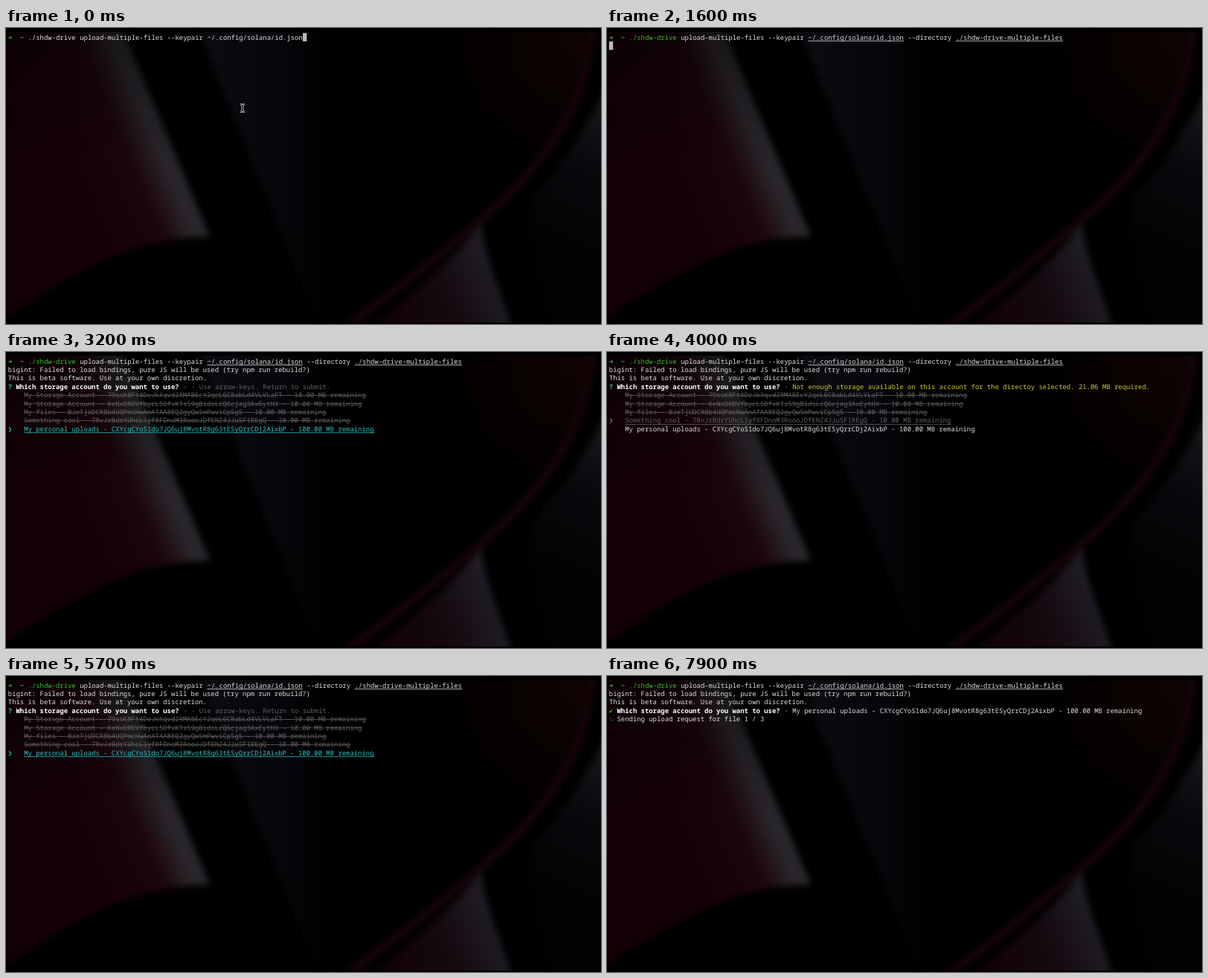
An HTML page that plays this animation: 800x399 px, repeating every 8 s.

```html
<!DOCTYPE html>
<html lang="en">
<head>
<meta charset="utf-8">
<title>Terminal upload</title>
<style>
  html, body { margin: 0; width: 100%; height: 100%; overflow: hidden; background: #000; }
  svg { display: block; width: 100%; height: 100%; }
  text {
    font: 500 8.925px "Noto Sans Mono", "DejaVu Sans Mono", monospace;
    white-space: pre;
    text-rendering: geometricPrecision;
  }
  .bold { font-weight: 700; }
</style>
</head>
<body>
<svg viewBox="0 0 800 399" xmlns="http://www.w3.org/2000/svg">
  <defs>
    <linearGradient id="red" gradientUnits="userSpaceOnUse" x1="20" y1="223" x2="214" y2="141">
      <stop offset="0" stop-color="#120004"/>
      <stop offset=".5" stop-color="#170207"/>
      <stop offset=".73" stop-color="#1c060b"/>
      <stop offset=".92" stop-color="#29262b"/>
      <stop offset="1" stop-color="#27262b"/>
    </linearGradient>
    <linearGradient id="shade" x1="0" y1="0" x2="0" y2="1">
      <stop offset="0" stop-color="#000" stop-opacity=".5"/>
      <stop offset=".5" stop-color="#000" stop-opacity="0"/>
    </linearGradient>
    <linearGradient id="panel" gradientUnits="userSpaceOnUse" x1="290" y1="0" x2="435" y2="0">
      <stop offset="0" stop-color="#0b0a10"/>
      <stop offset=".6" stop-color="#060509"/>
      <stop offset="1" stop-color="#000"/>
    </linearGradient>
    <radialGradient id="corner" gradientUnits="userSpaceOnUse" cx="765" cy="20" r="190">
      <stop offset="0" stop-color="#0e0302"/>
      <stop offset="1" stop-color="#000"/>
    </radialGradient>
    <linearGradient id="wedge" gradientUnits="userSpaceOnUse" x1="520" y1="380" x2="658" y2="322">
      <stop offset="0" stop-color="#120306"/>
      <stop offset=".5" stop-color="#150a10"/>
      <stop offset="1" stop-color="#201e27"/>
    </linearGradient>
    <linearGradient id="side" gradientUnits="userSpaceOnUse" x1="705" y1="290" x2="800" y2="80">
      <stop offset="0" stop-color="#030103"/>
      <stop offset=".55" stop-color="#0a080c"/>
      <stop offset="1" stop-color="#1b1a20"/>
    </linearGradient>
    <filter id="soft" color-interpolation-filters="sRGB" filterUnits="userSpaceOnUse" x="-30" y="-30" width="860" height="460">
      <feGaussianBlur stdDeviation="4"/>
    </filter>
    <path id="redShape" d="M-20 -20H147L274 281Q200 283 150 305Q70 340 -20 405Z"/>
    <path id="beam" d="M315 103q3 0 3 3v4q0 3-3 3M321 103q-3 0-3 3m0 4q0 3 3 3M316 108h4"/>
  </defs>

  <rect width="800" height="399"/>
  <g filter="url(#soft)">
    <use href="#redShape" fill="url(#red)"/>
    <use href="#redShape" fill="url(#shade)"/>
    <path d="M251 -15H440V410H424Z" fill="url(#panel)"/>
    <path d="M560 -20H786C790 110 705 200 640 256L560 250Z" fill="url(#corner)"/>
    <path d="M830 30C790 120 760 175 705 230C695 280 715 350 740 430H830Z" fill="url(#side)"/>
    <path d="M640 262C638 296 662 345 685 420H470C540 365 598 318 640 262Z" fill="url(#wedge)"/>
    <path d="M788 -20C792 110 705 201 640 257C580 308 520 358 455 404" fill="none" stroke="#19040a" stroke-width="9"/>
  </g>
  <path d="M0 0H800V5H0ZM0 397H800V399H0Z"/>

  <g id="screen"></g>
  <g id="pointer" fill="none">
    <use href="#beam" stroke="#ddd" stroke-width="2.6"/>
    <use href="#beam" stroke="#000"/>
  </g>
</svg>

<script>
const LOOP = 8000, LEFT = 2.8, CELL = 5.355, TOP = 6.8, LINE = 11.4;
const WHITE = '#dedede', GREEN = '#2fc12f', CYAN = '#2cc5c5', GRAY = '#626262', YELLOW = '#cbcb35';
const SPINNER = '⠋⠙⠹⠸⠼⠴⠦⠧⠇⠏';

// Times of the events in ms; each selection entry is [time, option index].
const PASTED = 100, ENTERED = 1000, STARTED = 1700, PROMPTED = 1800, SUBMITTED = 7400;
const SELECTIONS = [
  [1800, 0], [2800, 1], [2900, 2], [3000, 3], [3100, 4],
  [4000, 3], [4100, 2], [4200, 1], [4300, 0],
  [5400, 1], [5500, 2], [5600, 3], [5700, 4]
];
const OPTIONS = [
  'My Storage Account - 79ssK8Ft4DeJkXqvdZRMABEcY2qeL6C8abLd4VLVLaFT - 10.00 MB remaining',
  'My Storage Account - KeNxDRDVfbycL5DfvKTs59gBidsLcQ6cjag3AxEytHX - 10.00 MB remaining',
  'My files - BJeTjUDCR8b4UQPmcHwAnATAA8EQ2gyQwSmPwviCpSg5 - 10.00 MB remaining',
  'Something cool - 7RvJrBdrYUhcL1yf8FDnoM3RoooJDfENZ4JJuSF1REgQ - 10.00 MB remaining',
  'My personal uploads - CXYcgCYoS1do7JQ6uj8MvotR8g63tESyQrrCDj2AixbP - 100.00 MB remaining'
];
const USABLE = OPTIONS.length - 1;

const screen = document.getElementById('screen');
const pointer = document.getElementById('pointer');
const colX = col => LEFT + col * CELL;
const rowY = row => TOP + row * LINE;

// A run of text at a cell; rule is the height of an optional line across it.
function put(row, col, str, color = WHITE, { bold = false, rule = 0 } = {}) {
  const text = `<text x="${colX(col)}" y="${rowY(row) + 8.8}" fill="${color}"${bold ? ' class="bold"' : ''}>${str}</text>`;
  return rule
    ? text + `<rect x="${colX(col)}" y="${rowY(row) + rule}" width="${str.length * CELL}" height=".75" fill="${color}"/>`
    : text;
}
const UNDER = { rule: 10.4 }, STRIKE = { rule: 5.7 }, BOLD = { bold: true };

const block = (row, col) =>
  `<rect x="${colX(col)}" y="${rowY(row)}" width="${CELL}" height="11.2" fill="#bcbcbc"/>`;

function commandLine(t) {
  const pasted = t >= PASTED;
  const path = pasted ? UNDER : {};
  let out = put(0, 0, '➜', '#45d96c', BOLD) + put(0, 3, '~', CYAN, BOLD)
    + put(0, 5, './shdw-drive', pasted ? GREEN : WHITE)
    + put(0, 18, 'upload-multiple-files --keypair')
    + put(0, 50, '~/.config/solana/id.json', WHITE, path);
  if (pasted) out += put(0, 75, '--directory') + put(0, 87, './shdw-drive-multiple-files', WHITE, UNDER);
  if (t < ENTERED) out += block(0, pasted ? 114 : 74);
  return out;
}

function question(mark, color) {
  return put(3, 0, mark, color, BOLD)
    + put(3, 2, 'Which storage account do you want to use?', '#fff', BOLD)
    + put(3, 44, '›', GRAY);
}

function menu(selected) {
  const hint = selected === USABLE
    ? put(3, 46, '- Use arrow-keys. Return to submit.', GRAY)
    : put(3, 46, 'Not enough storage available on this account for the directoy selected. 21.06 MB required.', YELLOW);
  const options = OPTIONS.map((label, i) => {
    const active = i === selected, usable = i === USABLE;
    const color = !usable ? GRAY : active ? CYAN : WHITE;
    const line = active ? UNDER : usable ? {} : STRIKE;
    return (active ? put(4 + i, 0, '❯', usable ? CYAN : '#777', BOLD) : '') + put(4 + i, 4, label, color, line);
  });
  return question('?', CYAN) + hint + options.join('');
}

function uploading(t) {
  const step = Math.floor((t - SUBMITTED) / 80) % SPINNER.length;
  return question('✔', GREEN) + put(3, 46, OPTIONS[USABLE])
    + put(4, 0, SPINNER[step], '#285a78') + put(4, 2, 'Sending upload request for file 1 / 3');
}

function draw(t) {
  let out = commandLine(t);
  if (t >= ENTERED && t < STARTED) out += block(1, 0);
  if (t >= STARTED) out += put(1, 0, 'bigint: Failed to load bindings, pure JS will be used (try npm run rebuild?)');
  if (t >= STARTED && t < PROMPTED) out += block(2, 0);
  if (t >= PROMPTED) {
    out += put(2, 0, 'This is beta software. Use at your own discretion.');
    out += t < SUBMITTED ? menu(SELECTIONS.filter(([at]) => at <= t).pop()[1]) : uploading(t);
  }
  return out;
}

let shown = '';
const start = performance.now();
function frame() {
  const t = Math.max(0, performance.now() - start) % LOOP;
  const next = draw(t);
  if (next !== shown) screen.innerHTML = shown = next;
  pointer.style.display = t < ENTERED ? '' : 'none';
  requestAnimationFrame(frame);
}
frame();
</script>
</body>
</html>
```
